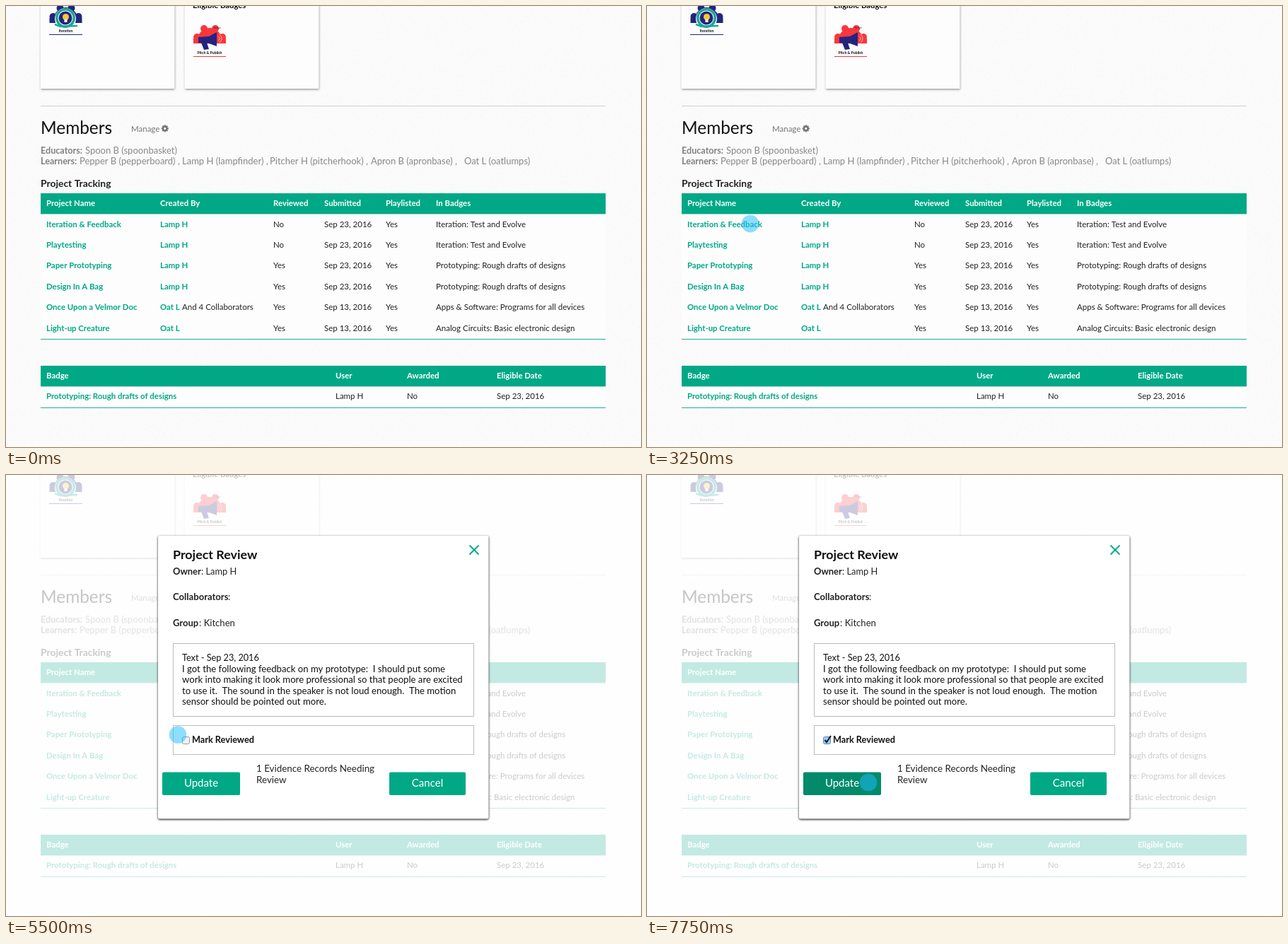
Animation, 898 px wide and 624 px high, one loop 8000 ms. Source, as an HTML page with a canvas:

```html
<!DOCTYPE html>
<html lang="en">
<head>
<meta charset="utf-8">
<title>Project review</title>
<style>
  html, body { margin: 0; width: 100%; height: 100%; overflow: hidden; background: #fbfbfb; }
  canvas { display: block; }
</style>
</head>
<body>
<canvas id="stage" width="898" height="624"></canvas>
<script>
const W = 898, H = 624, LOOP = 8000, STEP = 250;
const GREEN = '#00a886', NAVY = '#24247e', RED = '#f9373c', INK = '#222';
const ctx = document.getElementById('stage').getContext('2d');

// Pointer places: time, x, y, and whether it is a click ring
const pointer = [
  [1000, 519, 133], [1250, 400, 215], [1500, 250, 287], [1750, 183, 277],
  [2000, 186, 259], [2250, 188, 250.5], [2750, 191, 253], [3000, 178, 285],
  [3250, 146, 308], [3500, 133, 313], [4000, 133, 319, true], [4500, 133, 319],
  [4750, 133, 322], [5000, 136, 332], [5250, 185, 350], [5500, 243, 367.5],
  [5750, 253, 374], [6000, 255.5, 375], [6500, 255.5, 375, true],
  [7000, 272, 382], [7250, 318.5, 396], [7500, 325, 422], [7750, 313, 435]
];

const projects = [
  ['Iteration & Feedback', 'Lamp H', 'No', 'Sep 23, 2016', 'Iteration: Test and Evolve'],
  ['Playtesting', 'Lamp H', 'No', 'Sep 23, 2016', 'Iteration: Test and Evolve'],
  ['Paper Prototyping', 'Lamp H', 'Yes', 'Sep 23, 2016', 'Prototyping: Rough drafts of designs'],
  ['Design In A Bag', 'Lamp H', 'Yes', 'Sep 23, 2016', 'Prototyping: Rough drafts of designs'],
  ['Once Upon a Velmor Doc', 'Oat L', 'Yes', 'Sep 13, 2016', 'Apps & Software: Programs for all devices'],
  ['Light-up Creature', 'Oat L', 'Yes', 'Sep 13, 2016', 'Analog Circuits: Basic electronic design']
];

function text(str, x, y, size, color = INK, weight = 400, align = 'left') {
  ctx.font = `${weight} ${size}px Lato, sans-serif`;
  ctx.textAlign = align;
  ctx.fillStyle = color;
  ctx.fillText(str, x, y);
}

function bold(str, x, y, size, color = INK, align = 'left') {
  text(str, x, y, size, color, 700, align);
}

function rect(x, y, w, h, color) {
  ctx.fillStyle = color;
  ctx.fillRect(x, y, w, h);
}

function roundRect(x, y, w, h, color) {
  ctx.fillStyle = color;
  ctx.beginPath();
  ctx.roundRect(x, y, w, h, 2);
  ctx.fill();
}

function frame(x, y, w, h, color) {
  ctx.strokeStyle = color;
  ctx.lineWidth = 1;
  ctx.strokeRect(x + .5, y + .5, w - 1, h - 1);
}

function disc(x, y, r, color) {
  ctx.fillStyle = color;
  ctx.beginPath();
  ctx.arc(x, y, r, 0, 2 * Math.PI);
  ctx.fill();
}

function arc(x, y, r, from, to, color, width) {
  ctx.strokeStyle = color;
  ctx.lineWidth = width;
  ctx.beginPath();
  ctx.arc(x, y, r, from, to);
  ctx.stroke();
}

function path(points, color, width) {
  ctx.beginPath();
  points.forEach(([x, y]) => ctx.lineTo(x, y));
  if (width) {
    ctx.strokeStyle = color;
    ctx.lineWidth = width;
    ctx.stroke();
  } else {
    ctx.fillStyle = color;
    ctx.fill();
  }
}

function withShadow(color, blur, dy, draw) {
  ctx.save();
  ctx.shadowColor = color;
  ctx.shadowBlur = blur;
  ctx.shadowOffsetY = dy;
  draw();
  ctx.restore();
}

// Faint seeded paper grain
function makePaper() {
  const tile = document.createElement('canvas');
  tile.width = tile.height = 150;
  const g = tile.getContext('2d');
  g.fillStyle = '#fbfbfb';
  g.fillRect(0, 0, 150, 150);
  let seed = 7;
  const rnd = () => (seed = seed * 16807 % 2147483647) / 2147483647;
  g.fillStyle = '#f8f8f8';
  for (let i = 0; i < 4500; i++) g.fillRect(rnd() * 150 | 0, rnd() * 150 | 0, 1, 1);
  return ctx.createPattern(tile, 'repeat');
}
const paper = makePaper();

// Half a cog with rounded teeth
function cog(cx, y, color) {
  for (const side of [-1, 1]) {
    disc(cx + side * 18, y - 1, 5, color);
    disc(cx + side * 8, y - 13, 5, color);
  }
  ctx.beginPath();
  ctx.arc(cx, y + 3, 17, Math.PI, 2 * Math.PI);
  ctx.fill();
  rect(cx - 23, y + 1, 46, 7, color);
}

function badges() {
  for (const x of [48, 252]) {
    withShadow('rgba(0,0,0,.5)', 3, 1, () => rect(x + .5, -10, 190, 127, '#fdfdfd'));
  }

  cog(84.5, 16, NAVY);
  disc(84, 18, 15, '#fdfdfd');
  disc(84, 17, 14, '#1ba898');
  disc(84, 17, 10.5, '#fdfdfd');
  disc(84, 17, 9.5, NAVY);
  disc(84.5, 15.5, 4.5, '#f8c832');
  rect(82.5, 19, 4, 4, '#fdfdfd');
  path([[69, 26], [77, 29], [101, 28]], '#1ba898', 2.5);
  bold('Iteration', 84.5, 37, 5.2, '#111', 'center');
  rect(61, 40, 47, 1, NAVY);

  bold('Eligible Badges', 264, 3, 11.3, '#111');
  cog(288, 45, RED);
  path([[272, 44], [287, 43], [298, 37], [298, 57], [287, 53], [272, 52]], NAVY);
  path([[276, 52], [284, 52], [287, 61], [280, 62]], NAVY);
  for (const r of [4, 7]) arc(298, 46, r, -1, 1, '#fbb', 1);
  text('Badge', 294, 32, 3.6, '#333');
  bold('Pitch & Publish', 288, 68, 5.2, '#111', 'center');
  rect(265, 71, 46, 1, RED);
}

function gear(x, y) {
  ctx.save();
  ctx.translate(x, y);
  for (let i = 0; i < 8; i++) {
    rect(-1.2, -5, 2.4, 3, '#777');
    ctx.rotate(Math.PI / 4);
  }
  arc(0, 0, 2.7, 0, 2 * Math.PI, '#777', 2.2);
  ctx.restore();
}

function members() {
  rect(49, 141, 799, 1, '#d0d0d0');
  text('Members', 49, 180.5, 24.4, '#111');
  text('Manage', 177, 177.5, 11.5, '#777');
  gear(224.8, 173.3);
  bold('Educators:', 49, 209, 12.6, '#808080');
  text('Spoon B (spoonbasket)', 112, 209, 13, '#888');
  bold('Learners:', 49, 224.3, 12.6, '#808080');
  [['Pepper B (pepperboard) ,', 104], ['Lamp H (lampfinder) ,', 249],
   ['Pitcher H (pitcherhook) ,', 373], ['Apron B (apronbase) ,', 516],
   ['Oat L (oatlumps)', 648]]
    .forEach(([name, x]) => text(name, x, 224.3, 13, '#888'));
}

function table(y, bottom, heads) {
  rect(49, y, 799, bottom - y, '#fdfdfd');
  rect(49, y, 799, 29.4, GREEN);
  heads.forEach(([label, x]) => bold(label, x, y + 18.4, 11.4, '#fff'));
  rect(49, bottom, 799, 1, '#1fae92');
}

function tables() {
  bold('Project Tracking', 49, 255.5, 13.9);
  table(265, 471, [['Project Name', 57], ['Created By', 218], ['Reviewed', 378],
    ['Submitted', 450], ['Playlisted', 537], ['In Badges', 608]]);
  projects.forEach(([name, owner, reviewed, date, badge], i) => {
    const y = 312.6 + i * 29.4;
    bold(name, 57, y, 11.4, GREEN);
    bold(owner, 218, y, 11.4, GREEN);
    text(reviewed, 378, y, 11.5);
    text(date, 450, y, 11.5);
    text('Yes', 537, y, 11.5);
    text(badge, 608, y, 11.5);
    if (i === 4) text('And 4 Collaborators', 249, y, 11.5);
  });

  table(509, 568, [['Badge', 57], ['User', 466], ['Awarded', 567], ['Eligible Date', 694]]);
  bold('Prototyping: Rough drafts of designs', 57, 556, 11.4, GREEN);
  text('Lamp H', 466, 556, 11.5);
  text('No', 567, 556, 11.5);
  text('Sep 23, 2016', 694, 556, 11.5);
}

function button(label, x, w, color) {
  roundRect(x, 420.5, w, 32.5, color);
  text(label, x + w / 2, 441, 15, '#fff', 400, 'center');
}

function checkbox(checked) {
  roundRect(249.5, 370.5, 10, 10, checked ? '#9fcdf5' : '#f1f1f1');
  ctx.strokeStyle = checked ? '#5583b8' : '#999';
  ctx.lineWidth = 1;
  ctx.stroke();
  if (checked) path([[251.5, 375], [254, 378], [260, 369]], '#111', 2);
}

function modal(t) {
  rect(0, 0, W, H, 'rgba(255,255,255,.76)');
  withShadow('#000', 3, 1, () => roundRect(215, 86, 467.5, 400.5, '#fff'));

  bold('Project Review', 236, 119, 17.9, '#111');
  path([[655.5, 99.5], [668.5, 112.5]], GREEN, 1.8);
  path([[668.5, 99.5], [655.5, 112.5]], GREEN, 1.8);
  bold('Owner', 236, 141, 12.9);
  text(': Lamp H', 276, 141, 12.8);
  bold('Collaborators', 236, 177.3, 13.1);
  text(':', 314, 177.3, 12.8);
  bold('Group', 236, 213.6, 13);
  text(': Kitchen', 273, 213.6, 13.1);

  frame(236, 238, 426, 104, '#bbb');
  text('Text - Sep 23, 2016', 249, 263, 12.7, '#111');
  ['I got the following feedback on my prototype:  I should put some',
   'work into making it look more professional so that people are excited',
   'to use it.  The sound in the speaker is not loud enough.  The motion',
   'sensor should be pointed out more.']
    .forEach((line, i) => text(line, 249, 278.6 + i * 15.6, 13.15, '#111'));

  frame(236, 354, 426, 42, '#bbb');
  checkbox(t >= 6750);
  bold('Mark Reviewed', 263, 379.3, 12.7, '#111');
  text('1 Evidence Records Needing', 354, 420, 13.4);
  text('Review', 354, 435.5, 13.4);
  button('Update', 221, 110, t >= 7500 ? '#028a6b' : GREEN);
  button('Cancel', 542, 108, GREEN);
}

function drawPointer(t) {
  const now = pointer.filter(([start]) => start <= t).pop();
  if (!now) return;
  const [, x, y, ring] = now;
  if (ring) arc(x, y, 15.3, 0, 2 * Math.PI, 'rgba(90,190,225,.35)', 2);
  else disc(x, y, 12.3, 'rgba(30,190,255,.5)');
}

function draw(t) {
  rect(0, 0, W, H, paper);
  badges();
  members();
  tables();
  if (t >= 4250) modal(t);
  drawPointer(t);
}

const begin = performance.now();
function tick() {
  const t = (performance.now() - begin) % LOOP;
  draw(Math.floor(t / STEP) * STEP);
  requestAnimationFrame(tick);
}
tick();
</script>
</body>
</html>
```
